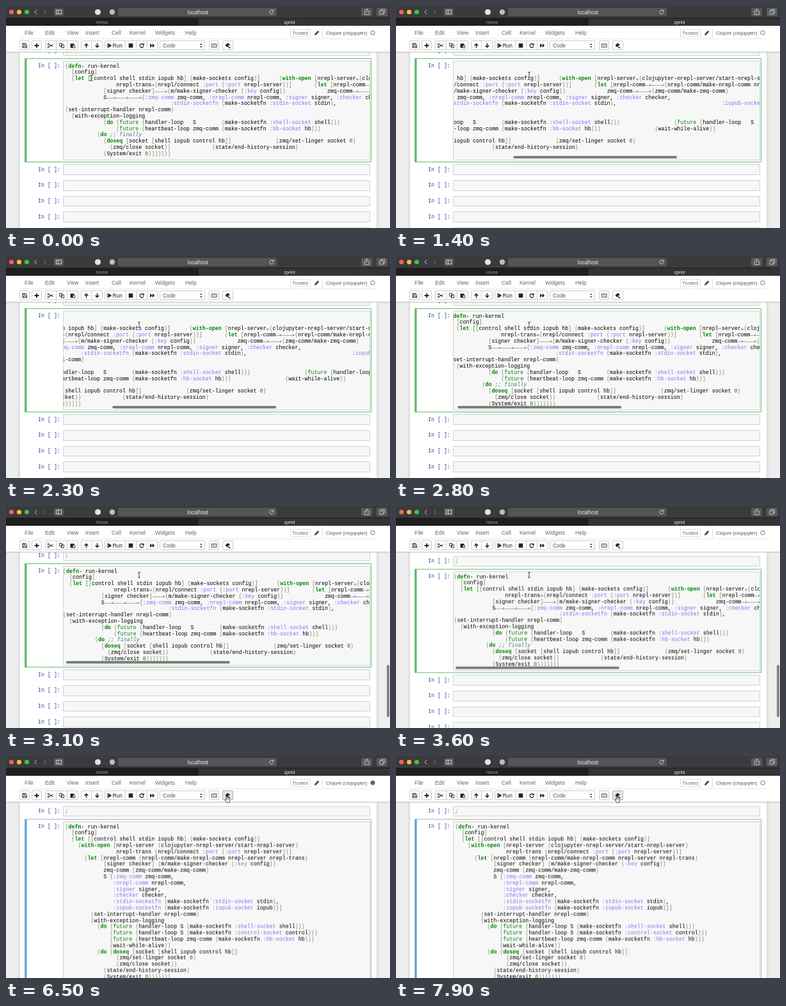
Recreate the animation shown at these times as an HTML page. Size 600 by 348 pixels, loop 8 s.

```html
<!DOCTYPE html>
<html lang="en">
<head>
<meta charset="utf-8">
<title>Notebook</title>
<style>
  html, body { margin: 0; width: 100%; height: 100%; overflow: hidden; background: #eee; }
  #stage { position: relative; width: 600px; height: 348px; overflow: hidden; background: #eee; }
  #stage > svg { position: absolute; left: 0; top: 0; }
  #sheet { position: absolute; left: 22px; top: 60px; width: 557px; height: 330px;
    background: #fff; box-shadow: 0 0 5px 1px rgba(87, 87, 87, .2); }
  #cells { position: absolute; left: 29px; top: 58px; width: 542px; will-change: transform; }
  .cell { position: relative; box-sizing: border-box; height: 24.7px; font: 8.32px/9.8px "Liberation Mono", monospace; }
  .label { position: absolute; left: 21px; top: 7px; color: #303f9f; white-space: pre; }
  .input { position: absolute; box-sizing: border-box; left: 60px; top: 3.5px; width: 479.5px; height: 16.7px;
    overflow: hidden; border: 1px solid #cfcfcf; border-radius: 1px; background: #f7f7f7; }
  pre { margin: 0; padding: 2.6px 0 0 2.5px; font: inherit; color: #000; tab-size: 4; }
  #active { height: auto; margin-top: -.7px; padding: 3.5px 0 3px 60px; border-radius: 1px;
    box-shadow: inset 0 0 0 1px var(--edge), inset 3.5px 0 0 var(--bar); }
  #active .input { position: relative; left: 0; top: 0; height: auto; }
  #active pre { padding: 3.2px 0 4px 2.5px; width: 900px; }
  #hbar { position: absolute; left: 2px; bottom: 1.5px; width: 256px; height: 4px; border-radius: 2px; background: #7d7d7d; }
  #vbar { position: absolute; left: 595px; top: 249px; width: 4px; height: 82px; border-radius: 2px; background: #858585; }
  .kw { color: #008000; font-weight: bold; }
  .fn, .num { color: #008000; }
  .atom { color: #7f74f5; }
  .br { color: #86866a; }
  .note { color: #408080; font-style: italic; }
  .match { color: #0b0; }
  .tab { position: relative; background: linear-gradient(#aaa, #aaa) 0 5px / 100% 1px no-repeat; }
  .tab::after { content: ""; position: absolute; right: 0; top: 3.4px;
    border: solid transparent; border-width: 2px 0 2px 3px; border-left-color: #999; }
  svg text { font-family: "Liberation Sans", Arial, sans-serif; }
</style>
</head>
<body>
<div id="stage">
  <div id="sheet"></div>
  <div id="cells"></div>
  <div id="vbar"></div>
  <svg id="chrome" width="600" height="348" viewBox="0 0 600 348"></svg>
</div>
<script>
const LOOP = 8000, STEP = 100;
const $ = id => document.getElementById(id);

const messy = `(defn- run-kernel
  [config]
  (let [[control shell stdin iopub hb] (make-sockets config)]      (with-open [nrepl-server\t(clojupyter-nrepl-server/start-nrepl-server)
                nrepl-trans\t(nrepl/connect :port (:port nrepl-server))]       (let [nrepl-comm\t\t(nrepl-comm/make-nrepl-comm nrepl-server nrepl-trans)
            [signer checker]\t(m/make-signer-checker (:key config))             zmq-comm\t\t(zmq-comm/make-zmq-comm)
            S\t\t\t{:zmq-comm zmq-comm, :nrepl-comm nrepl-comm, :signer signer, :checker checker,
                                 :stdin-socketfn (make-socketfn :stdin-socket stdin),                                 :iopub-socketfn (make-socketfn :iopub-socket iopub)}]
(set-interrupt-handler nrepl-comm)
  (with-exception-logging
            (do (future (handler-loop   S        (make-socketfn :shell-socket shell)))                 (future (handler-loop   S        (make-socketfn :control-socket control)))
                (future (heartbeat-loop zmq-comm (make-socketfn :hb-socket hb)))                 (wait-while-alive))
          (do ;; finally
            (doseq [socket [shell iopub control hb]]              (zmq/set-linger socket 0)
              (zmq/close socket))             (state/end-history-session)
            (System/exit 0)))))))`;

const tidy = `(defn- run-kernel
  [config]
  (let [[control shell stdin iopub hb] (make-sockets config)]
    (with-open [nrepl-server (clojupyter-nrepl-server/start-nrepl-server)
                nrepl-trans (nrepl/connect :port (:port nrepl-server))]
      (let [nrepl-comm (nrepl-comm/make-nrepl-comm nrepl-server nrepl-trans)
            [signer checker] (m/make-signer-checker (:key config))
            zmq-comm (zmq-comm/make-zmq-comm)
            S {:zmq-comm zmq-comm,
               :nrepl-comm nrepl-comm,
               :signer signer,
               :checker checker,
               :stdin-socketfn (make-socketfn :stdin-socket stdin),
               :iopub-socketfn (make-socketfn :iopub-socket iopub)}]
        (set-interrupt-handler nrepl-comm)
        (with-exception-logging
          (do (future (handler-loop S (make-socketfn :shell-socket shell)))
              (future (handler-loop S (make-socketfn :control-socket control)))
              (future (heartbeat-loop zmq-comm (make-socketfn :hb-socket hb)))
              (wait-while-alive))
          (do (doseq [socket [shell iopub control hb]]
                (zmq/set-linger socket 0)
                (zmq/close socket))
            (state/end-history-session)
            (System/exit 0)))))))`;

const span = (kind, text) => `<span class="${kind}">${text}</span>`;

function tokenKind(token) {
  if (token === "\t") return "tab";
  if (token.startsWith(";")) return "note";
  if (token.startsWith(":")) return "atom";
  if (/^[()[\]{}]$/.test(token)) return "br";
  if (/^(defn-|let|with-open|do|doseq)$/.test(token)) return "kw";
  if (token === "future") return "fn";
  return /^\d+$/.test(token) ? "num" : "";
}

const highlight = code => code.replace(/;.*|\t|[()[\]{}]|[^\s()[\]{}]+/g, token => {
  const kind = tokenKind(token);
  return kind ? span(kind, token) : token;
});

// The caret sits by the binding vector, so its two brackets are lit.
const open = span("br", "["), close = span("br", "]");
const messyHtml = highlight(messy)
  .replace(open + open, span("match", "[") + open)
  .replace("config" + span("br", ")") + close, "config" + span("br", ")") + span("match", "]"));
const tidyHtml = highlight(tidy);

const cell = (code = "") =>
  `<div class="cell"><span class="label">In [ ]:</span><div class="input"><pre>${code}</pre></div></div>`;
$("cells").innerHTML = cell(span("note", ";")) +
  `<div class="cell" id="active"><span class="label">In [ ]:</span><div class="input">
    <pre id="code"></pre><div id="hbar"></div></div></div>` + cell().repeat(5);

// Chrome
const rect = (x, y, w, h, fill, extra = "") => `<rect x="${x}" y="${y}" width="${w}" height="${h}" fill="${fill}" ${extra}/>`;
const dot = (x, y, r, fill, extra = "") => `<circle cx="${x}" cy="${y}" r="${r}" fill="${fill}" ${extra}/>`;
const line = (d, stroke, width = 1, extra = "") => `<path d="${d}" fill="none" stroke="${stroke}" stroke-width="${width}" ${extra}/>`;
const solid = (d, fill = "#222") => `<path d="${d}" fill="${fill}"/>`;
const text = (x, y, s, size, fill, anchor = "start") =>
  `<text x="${x}" y="${y}" font-size="${size}" fill="${fill}" text-anchor="${anchor}">${s}</text>`;
const button = (x, w, id = "") => rect(x + .5, 54.5, w, 14, "#fff", `stroke="#ccc" rx="1.5" ${id}`);

const browser = [
  rect(0, 0, 600, 19, "#3b3a3c"), rect(0, 19, 300, 12, "#1f1f20"), rect(300, 19, 300, 12, "#343436"),
  line("M0 19H600M300 19V31", "#111", .7),
  dot(8.5, 9.5, 3.6, "#fc605b"), dot(20.5, 9.5, 3.6, "#fdbc40"), dot(32.5, 9.5, 3.6, "#34c84a"),
  line("M48 6l-3 3.5 3 3.5", "#c8c8c8"), line("M59 6l3 3.5-3 3.5", "#777"),
  rect(39 + 16, 3, .1, 13, "#222"),
  rect(75, 3.5, 15, 12, "#59595b", 'rx="2"'), line("M78.5 6.5h8v6h-8zM81.5 6.5v6", "#ddd", .9),
  dot(143.5, 9.5, 4.6, "#e2e2e2"), dot(166, 9.5, 4.2, "#bdbdbd"),
  rect(175, 3, 248, 13, "#555457", 'rx="2.5"'),
  text(300, 12.6, "localhost", 8.2, "#eee", "middle"),
  line("M417.6 8a3 3 0 1 0 .4 2M418 5.8v2.5h-2.5", "#ddd", .9),
  rect(555, 3, 17, 13, "#59595b", 'rx="2"'), rect(579, 3, 17, 13, "#59595b", 'rx="2"'),
  line("M562 8h-1.7v5.5h7V8h-1.7M563.8 10.5V4.7m-2 2l2-2 2 2", "#ddd", .8),
  line("M584 7.5h5.5v5.5h-5.5zM586 7V5.3h5.7V11H590", "#ddd", .8),
  text(150, 28, "Home", 7, "#999", "middle"), text(443, 28, "zprint", 7, "#eee", "middle")
];

const menus = [["File", 29], ["Edit", 61], ["View", 95], ["Insert", 124], ["Cell", 165],
  ["Kernel", 193], ["Widgets", 233], ["Help", 280]];
const header = [
  rect(0, 31, 600, 41, "#fff"), line("M0 72H600", "#ccc", 1), rect(0, 72.5, 600, 1.5, "#888", 'opacity=".15"'),
  line("M22 51.5H579", "#e7e7e7"),
  ...menus.map(([name, x]) => text(x, 45.2, name, 8.6, "#666")),
  rect(444.5, 36.5, 31, 11.5, "#fff", 'stroke="#ddd"'), text(447.5, 45, "Trusted", 7.3, "#666"),
  solid("M482 46l.7-2.6 4.6-4.8 2 2-4.7 4.8z", "#444"),
  line("M494.5 35V50", "#ddd"), text(500, 45.2, "Clojure (clojupyter)", 7.7, "#555"),
  dot(573, 42, 3.2, "#fff", 'id="kernel" stroke="#666" stroke-width=".9"')
];

const toolbar = [
  button(21, 15), button(40, 15), button(61, 51), button(117, 33), button(154, 82),
  button(240, 70), button(317, 15), button(338, 16, 'id="tool"'),
  line("M78.5 55V68M95.5 55V68M133.5 55V68M186.5 55V68M203.5 55V68M220.5 55V68", "#ccc"),
  line("M25.8 58.7h5l1.7 1.7v4.8h-6.7zM27.3 58.7v2h3v-2M27.3 65v-2.3h3.7V65", "#222", .9),
  line("M48 58.5v7M44.5 62h7", "#222", 1.8),
  line("M67 60l6.5 3.8M67 64l6.5-3.8", "#222"),
  dot(66.3, 59.8, 1.2, "none", 'stroke="#222" stroke-width=".9"'), dot(66.3, 64.2, 1.2, "none", 'stroke="#222" stroke-width=".9"'),
  line("M83.7 58.5h4v4.7h-4zM86.5 60.8h4v4.7h-4z", "#222", .9),
  solid("M100.5 59h6v2.2h-2.4v4.3h-3.6z"), line("M104.7 61.8h3v3.8h-3z", "#222", .9),
  line("M125.5 65.7v-6.5m-2.8 3l2.8-3 2.8 3", "#222", 1.4), line("M142.5 58.3v6.5m-2.8-3l2.8 3 2.8-3", "#222", 1.4),
  rect(158.5, 58.5, 1.3, 7, "#222"), solid("M160.3 58.5l4.8 3.5-4.8 3.5z"), text(166.5, 65, "Run", 8.4, "#222"),
  rect(191.7, 58.7, 6.6, 6.6, "#222"),
  line("M214.6 60.3a3 3 0 1 0 .4 2.7", "#222", 1.2), solid("M215.9 58.2v3.5h-3.5z"),
  solid("M225 58.7l3.6 3.3-3.6 3.3zM228.7 58.7l3.6 3.3-3.6 3.3z"),
  text(245, 65, "Code", 8.4, "#555"), solid("M303 61l1.8-2.5 1.8 2.5zM303 63l1.8 2.5 1.8-2.5z", "#444"),
  line("M321.3 59.5h8v5h-8z", "#444", .9), line("M322.5 61h5.7M322.5 62.6h5.7", "#444", .7, 'stroke-dasharray="1 .6"'),
  solid("M342.6 61.5l3.4-3.2 2.2.7 1.7 2-1 1.1-1.2-.6-1 1 3.8 3-1.1 1.2-3.5-3.3-1 1z")
];

const outlined = (id, d, fill, stroke) =>
  `<path id="${id}" d="${d}" fill="${fill}" stroke="${stroke}" stroke-width=".8" stroke-linejoin="round"/>`;
const pointers = [
  `<g id="beam">${line("M-2 -4.5q2 0 2 1.5V3q0 1.5-2 1.5M2-4.5q-2 0-2 1.5M0 3q0 1.5 2 1.5", "#fff", 2)}` +
    `${line("M-2 -4.5q2 0 2 1.5V3q0 1.5-2 1.5M2-4.5q-2 0-2 1.5M0 3q0 1.5 2 1.5", "#222", .9)}</g>`,
  outlined("arrow", "M0-4V6l2.3-2 1.5 3.4 1.5-.7L3.8 3.4H7z", "#111", "#fff"),
  outlined("hand", "M-1-4q1-1 1.6 0V-.5l3.3.8q1 .4.8 1.6L4 5.5H0L-3 1.7q0-1.2 1-.8l1 .8z", "#fff", "#222")
];
$("chrome").innerHTML = [...browser, ...header, ...toolbar, `<g id="mouse">${pointers.join("")}</g>`].join("");

// Motion: rows of [time, value, ...]
const tracks = {
  mouse: [[0, 133, 113], [100, 133, 113], [800, 208, 108], [4050, 208, 108], [4750, 345, 67.5], [8000, 345, 67.5]],
  scrollX: [[0, 0], [700, 0], [1400, 172], [1800, 170], [2000, 169], [2300, 140], [2800, 8], [3100, 3.5], [3700, 1.8], [5800, 0]],
  scrollY: [[0, 0], [2800, 0], [3100, 8], [3600, 16.6], [8000, 16.6]]
};

function sample(rows, t) {
  const next = rows.findIndex(row => row[0] > t);
  if (next < 0) return rows[rows.length - 1].slice(1);
  const a = rows[next - 1], b = rows[next];
  const k = (t - a[0]) / (b[0] - a[0]);
  const eased = k * k * (3 - 2 * k);
  return a.slice(1).map((v, i) => v + (b[i + 1] - v) * eased);
}

// Visible from `start` to `end`, with a short fade out.
const shown = (t, start, end) => t < start ? 0 : Math.max(0, Math.min(1, (end - t) / 300));

let formatted = null;
function draw(t) {
  const [mx, my] = sample(tracks.mouse, t);
  const done = t >= 5800, command = t >= 5300, busy = t >= 5300 && t < 7000;
  const x = done ? 0 : sample(tracks.scrollX, t)[0];
  const [y] = sample(tracks.scrollY, t);

  if (formatted !== done) {
    $("code").innerHTML = done ? tidyHtml : messyHtml;
    formatted = done;
  }
  $("code").style.transform = `translateX(${-x}px)`;
  $("cells").style.transform = `translateY(${y}px)`;
  $("hbar").style.transform = `translateX(${x * .53}px)`;
  $("hbar").style.opacity = shown(t, 700, 3900);
  $("vbar").style.opacity = shown(t, 2900, 4400);
  $("active").style.setProperty("--edge", command ? "#ababab" : "#66bb6a");
  $("active").style.setProperty("--bar", command ? "#42a5f5" : "#66bb6a");
  $("kernel").setAttribute("fill", busy ? "#666" : "#fff");

  const overTool = mx > 338 && my < 71;
  const pointer = overTool ? "hand" : my > 82 ? "beam" : "arrow";
  for (const id of ["beam", "arrow", "hand"]) $(id).style.display = id === pointer ? "" : "none";
  $("mouse").setAttribute("transform", `translate(${mx} ${my})`);
  $("tool").setAttribute("fill", overTool ? "#e6e6e6" : "#fff");
  $("tool").setAttribute("stroke", overTool ? "#adadad" : "#ccc");
}

const begin = performance.now();
function tick() {
  const t = (performance.now() - begin) % LOOP;
  draw(Math.floor(t / STEP) * STEP);
  requestAnimationFrame(tick);
}
tick();
</script>
</body>
</html>
```
